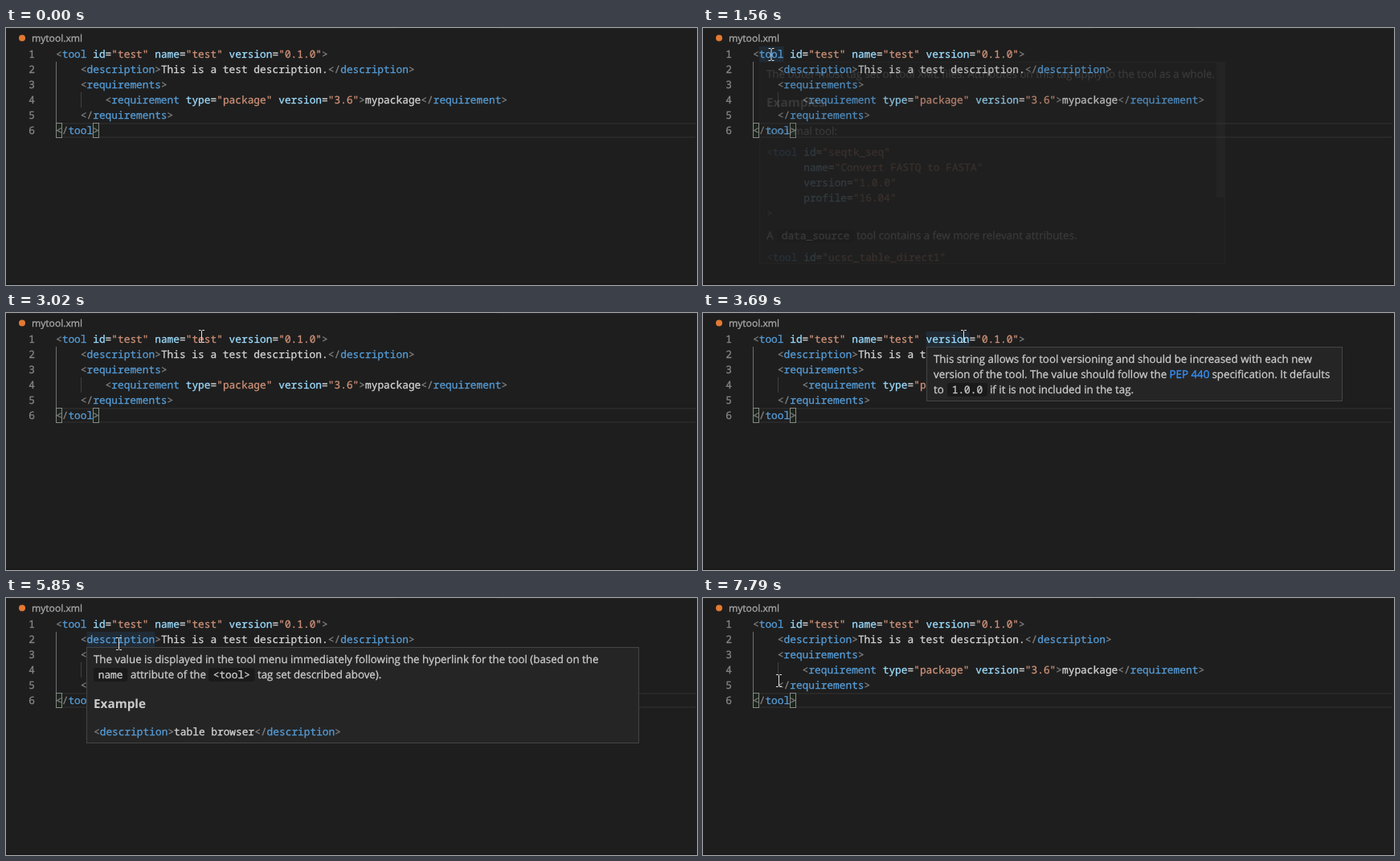
An HTML page for the animation above (8000 ms loop, 860 px wide and 320 px high).

```html
<!DOCTYPE html>
<html lang="en">
<head>
<meta charset="utf-8">
<title>Tag hover help</title>
<style>
  html, body { margin: 0; width: 100%; height: 100%; overflow: hidden; background: #1e1e1e; }
  svg { display: block; width: 860px; height: 320px; }
  text { white-space: pre; text-rendering: geometricPrecision; stroke-width: .3; }
  .mono { font: 12.83px "Noto Sans Mono", "DejaVu Sans Mono", monospace; }
  .ui { font: 13.33px "Open Sans", "Noto Sans", sans-serif; }
  .title { font: bold 15.3px "Open Sans", "Noto Sans", sans-serif; stroke-width: 0; }
  .file { font: 12.1px "Open Sans", "Noto Sans", sans-serif; }
</style>
</head>
<body>
<svg id="stage" viewBox="0 0 860 320" xmlns="http://www.w3.org/2000/svg"></svg>
<script>
const CHAR = 7.7, LINE = 19, LOOP = 8000;
const COLOR = { mark: '#808080', tag: '#569cd6', attr: '#9cdcfe', string: '#ce9178', plain: '#d4d4d4', body: '#cccccc' };
const stage = document.getElementById('stage');

function add(parent, name, attrs, content) {
  const node = document.createElementNS('http://www.w3.org/2000/svg', name);
  for (const key in attrs) node.setAttribute(key, attrs[key]);
  if (content) node.textContent = content;
  return parent.appendChild(node);
}
const rect = (parent, x, y, width, height, fill, more) =>
  add(parent, 'rect', { x, y, width, height, fill, ...more });
// A hairline in the text colour gives the slightly heavy look of hinted type.
const text = (parent, x, y, content, cls = 'ui', color = COLOR.body) =>
  add(parent, 'text', { x, y, class: cls, color, fill: 'currentColor', stroke: 'currentColor' }, content);

// Highlights one line of XML, each token on its own column.
function xml(parent, x, y, line) {
  const tokens = /(?<mark><\/?|>)|(?<tag>(?<=<\/?)\w+)|(?<string>"[^"]*")|(?<attr>\w+(?==))|(?<plain>=|[^<>"=]+?(?=\w+=|[<>"=]|$))/g;
  for (const match of line.matchAll(tokens)) {
    const kind = Object.keys(match.groups).find(key => match.groups[key]);
    text(parent, x + match.index * CHAR, y, match[0], 'mono', COLOR[kind]);
  }
}

function inlineCode(parent, x, y, content) {
  const width = content.length * CHAR;
  rect(parent, x, y - 13, width + 11.4, 17, '#0a0a0a', { 'fill-opacity': 0.4, rx: 3 });
  text(parent, x + 5.7, y, content, 'mono');
}

function panel(x, y, width, height) {
  const group = add(stage, 'g');
  rect(group, x + .5, y + .5, width - 1, height - 1, '#252526', { stroke: '#454545' });
  return group;
}

// Window edges and file name
rect(stage, 0, 0, 485, 1, '#252526');
rect(stage, 612, 0, 248, 1, '#252526');
rect(stage, 0, 318, 860, 2, '#191919');
add(stage, 'circle', { cx: 20, cy: 12.5, r: 4, fill: '#e37933' });
const fileName = text(stage, 32, 17, 'mytool.xml', 'file');

// Editor
const wordBox = rect(stage, 0, 0, 0, LINE, '#264f78', { 'fill-opacity': 0.25 });
rect(stage, 62, 118, 796, 2, '#282828');
rect(stage, 62, 135, 796, 2, '#282828');
rect(stage, 62, 42, 1, 76, '#707070');
rect(stage, 93, 80, 1, LINE, '#404040');
for (const x of [62.5, 108.5])
  rect(stage, x, 118.5, 7, 18, '#1b251b', { stroke: '#888888' });
[
  '<tool id="test" name="test" version="0.1.0">',
  '    <description>This is a test description.</description>',
  '    <requirements>',
  '        <requirement type="package" version="3.6">mypackage</requirement>',
  '    </requirements>',
  '</tool>'
].forEach((line, i) => {
  const y = 37 + i * LINE;
  text(stage, 28.3, y, String(i + 1), 'mono', '#858585');
  xml(stage, 62, y, line);
});

// Help for <tool>
const toolHelp = panel(70, 42, 580, 252);
text(toolHelp, 79, 62, 'The outer-most tag set of tool XML files. Attributes on this tag apply to the tool as a whole.');
text(toolHelp, 79, 98, 'Examples', 'title');
text(toolHelp, 79, 133, 'A normal tool:');
[
  '<tool id="seqtk_seq"',
  '      name="Convert FASTQ to FASTA"',
  '      version="1.0.0"',
  '      profile="16.04"',
  '>'
].forEach((line, i) => xml(toolHelp, 79, 159 + i * LINE, line));
text(toolHelp, 79, 263, 'A');
inlineCode(toolHelp, 92, 263, 'data_source');
text(toolHelp, 191, 263, 'tool contains a few more relevant attributes.');
xml(toolHelp, 79, 290, '<tool id="ucsc_table_direct1"');
const slider = rect(toolHelp, 639, 43, 10, 168, '#797979');

// Help for the version attribute
const versionHelp = panel(278, 42, 518, 68);
text(versionHelp, 287, 62, 'This string allows for tool versioning and should be increased with each new');
text(versionHelp, 287, 81, 'version of the tool. The value should follow the');
text(versionHelp, 580.5, 81, 'PEP 440', 'ui', '#3794ff');
text(versionHelp, 633.5, 81, 'specification. It defaults');
text(versionHelp, 287, 100, 'to');
inlineCode(versionHelp, 304, 100, '1.0.0');
text(versionHelp, 357, 100, 'if it is not included in the tag.');

// Help for <description>
const descriptionHelp = panel(100, 61, 688, 120);
text(descriptionHelp, 109, 81, 'The value is displayed in the tool menu immediately following the hyperlink for the tool (based on the');
inlineCode(descriptionHelp, 109, 100, 'name');
text(descriptionHelp, 155, 100, 'attribute of the');
inlineCode(descriptionHelp, 252, 100, '<tool>');
text(descriptionHelp, 313, 100, 'tag set described above).');
text(descriptionHelp, 109, 137, 'Example', 'title');
xml(descriptionHelp, 109, 171, '<description>table browser</description>');

// Pointers
const arrow = add(stage, 'path', {
  d: 'M.5 .5v16l3.7-3.6 2.5 5.6 2.2-1-2.5-5.4h5z', fill: '#fff', stroke: '#000', 'stroke-width': .8
});
const beam = add(stage, 'path', {
  d: 'M-3.5-7.5h2.5l1 1 1-1h2.5M0-6.5v13M-3.5 7.5h2.5l1-1 1 1h2.5', fill: 'none', stroke: '#e4e4e4'
});

// Pointer stops: time, x, y
const stops = [
  [870, 69, -2], [1020, 74, 10], [1140, 80, 21], [1290, 83.5, 30], [1410, 85, 33],
  [2900, 150.5, 28], [3020, 243.5, 29], [3170, 304.5, 29], [3290, 324.5, 29],
  [4880, 322.5, 29], [5030, 285.5, 38], [5150, 220.5, 52], [5300, 165.5, 56], [5420, 140.5, 57],
  [7250, 127.5, 68], [7370, 108.5, 86], [7490, 95.5, 100], [7640, 94.5, 102], [7790, 94.5, 103]
];
// Hovers: start, full, end, panel, word column, word length, row
const hovers = [
  [1560, 1710, 2900, toolHelp, 1, 4, 0],
  [3690, 3690, 5030, versionHelp, 28, 7, 0],
  [5730, 5850, 7250, descriptionHelp, 5, 11, 1]
];
const show = (node, opacity) => node.setAttribute('opacity', opacity);

function draw(t) {
  const stop = stops.findLast(s => s[0] <= t);
  show(arrow, stop && t < 1290 ? 1 : 0);
  show(beam, t >= 1290 ? 1 : 0);
  if (stop)
    for (const pointer of [arrow, beam])
      pointer.setAttribute('transform', `translate(${stop[1]} ${stop[2]})`);

  fileName.setAttribute('color', t >= 1020 && t < 1290 ? '#e0e0e0' : '#a9a9a9');
  show(slider, t < 2630 ? 0.4 : 0.11);
  show(wordBox, 0);
  for (const [start, full, end, help, column, length, row] of hovers) {
    const active = t >= start && t < end;
    show(help, !active ? 0 : t < full ? 0.15 : 1);
    if (!active) continue;
    show(wordBox, 1);
    wordBox.setAttribute('x', 62 + column * CHAR);
    wordBox.setAttribute('y', 23 + row * LINE);
    wordBox.setAttribute('width', length * CHAR);
  }
}

const began = performance.now();
function tick() {
  draw((performance.now() - began) % LOOP);
  requestAnimationFrame(tick);
}
tick();
</script>
</body>
</html>
```
